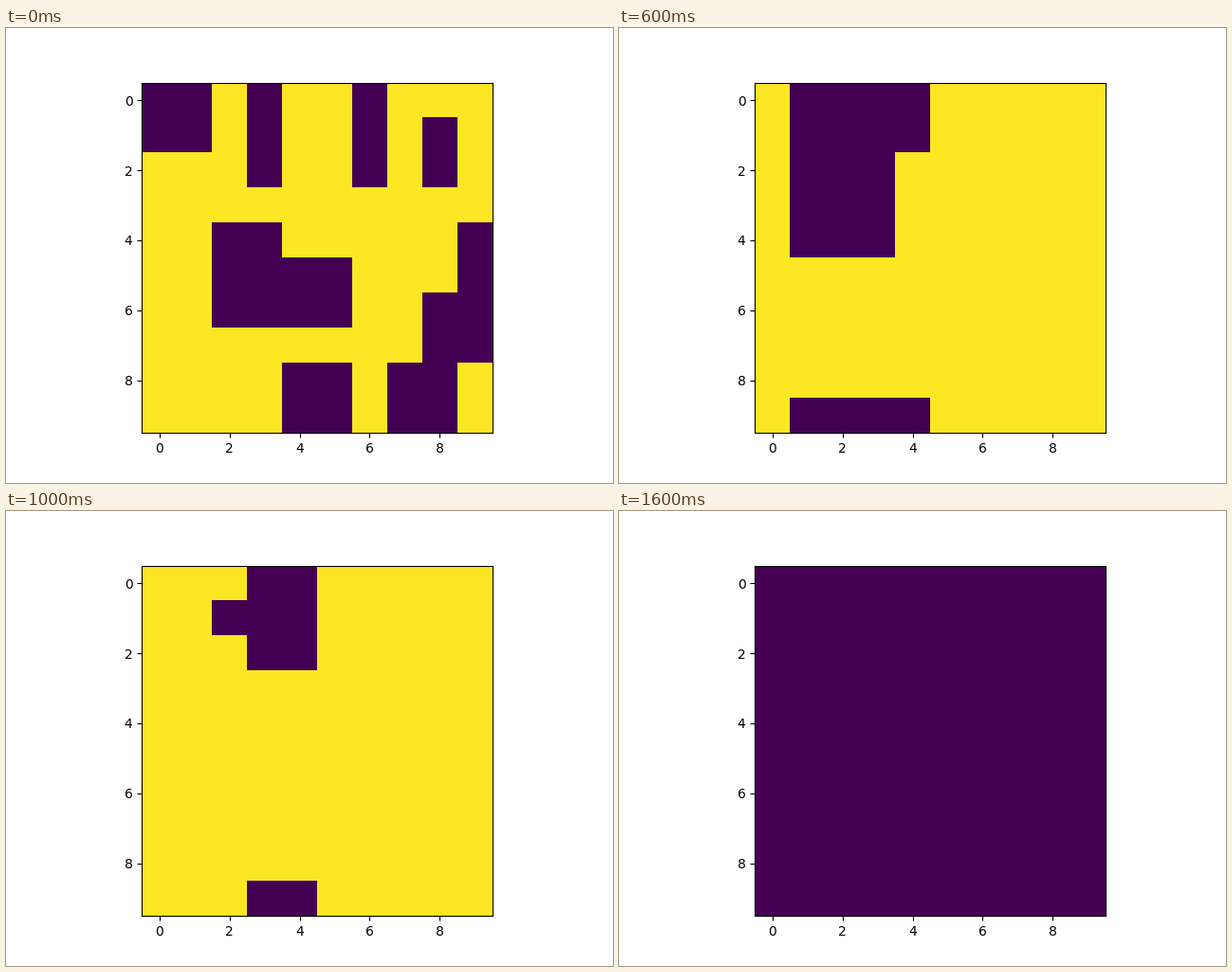
Recreate the animation shown at these times as a matplotlib script. Size 640 px wide and 480 px high, loop 8 s.

```python
import numpy as np
import matplotlib.pyplot as plt
from matplotlib.animation import FuncAnimation

SIZE = 10
STEP_MS = 200
STEPS = 40
LAST_SWEEP = 8

# Centres (row, col) of the small clusters at the start
CLUSTERS = [(0, 0.5), (1, 3), (1, 6), (1.5, 8), (4.5, 9),
            (5, 2.5), (5.5, 4.5), (6.5, 8.5), (9, 4.5), (9, 7.5)]

# Key poses of the shrinking domain: sweep, centre row, centre col, half height, half width
POSES = np.array([
    (1, 2.5, 2.7, 4.0, 2.24),
    (3, 1.3, 2.25, 3.2, 1.75),
    (5, 0.6, 3.25, 1.65, 1.23),
    (7, 2.0, 2.0, 0.6, 0.6),
    (8, 2.5, 2.5, 0.4, 0.4),
])
TILT = -0.1

rows, cols = np.indices((SIZE, SIZE))


def clusters():
    """Short upright clumps of down spins."""
    down = np.zeros((SIZE, SIZE), bool)
    for row, col in CLUSTERS:
        down |= np.hypot(rows - row, 1.5 * (cols - col)) < 1.45
    return down


def domain(sweep):
    """A tilted rounded block that wraps around the top edge."""
    row, col, height, width = (np.interp(sweep, POSES[:, 0], p) for p in POSES[:, 1:].T)
    dy = (rows - row + SIZE / 2) % SIZE - SIZE / 2
    dx = cols - col - TILT * dy
    return (dy / height) ** 4 + (dx / width) ** 4 < 1


def band(sweep):
    """A thin diagonal arm that soon dies out."""
    width = 0.78 * (2 - sweep)
    return (np.abs(rows - 10.3 + 0.35 * cols) < width) & (cols > 2)


def lattice(sweep):
    down = domain(sweep) | band(sweep) if sweep else clusters()
    return np.where(down, -1, 1)


fig, ax = plt.subplots(figsize=(6.4, 4.8), dpi=100)
image = ax.imshow(lattice(0), cmap="viridis")


def update(step):
    image.set_data(lattice(min(step, LAST_SWEEP)))
    # A uniform lattice has no range, so it maps to the lowest colour
    image.autoscale()
    return [image]


anim = FuncAnimation(fig, update, frames=STEPS, interval=STEP_MS,
                     repeat=True, repeat_delay=0)
plt.show()
```
